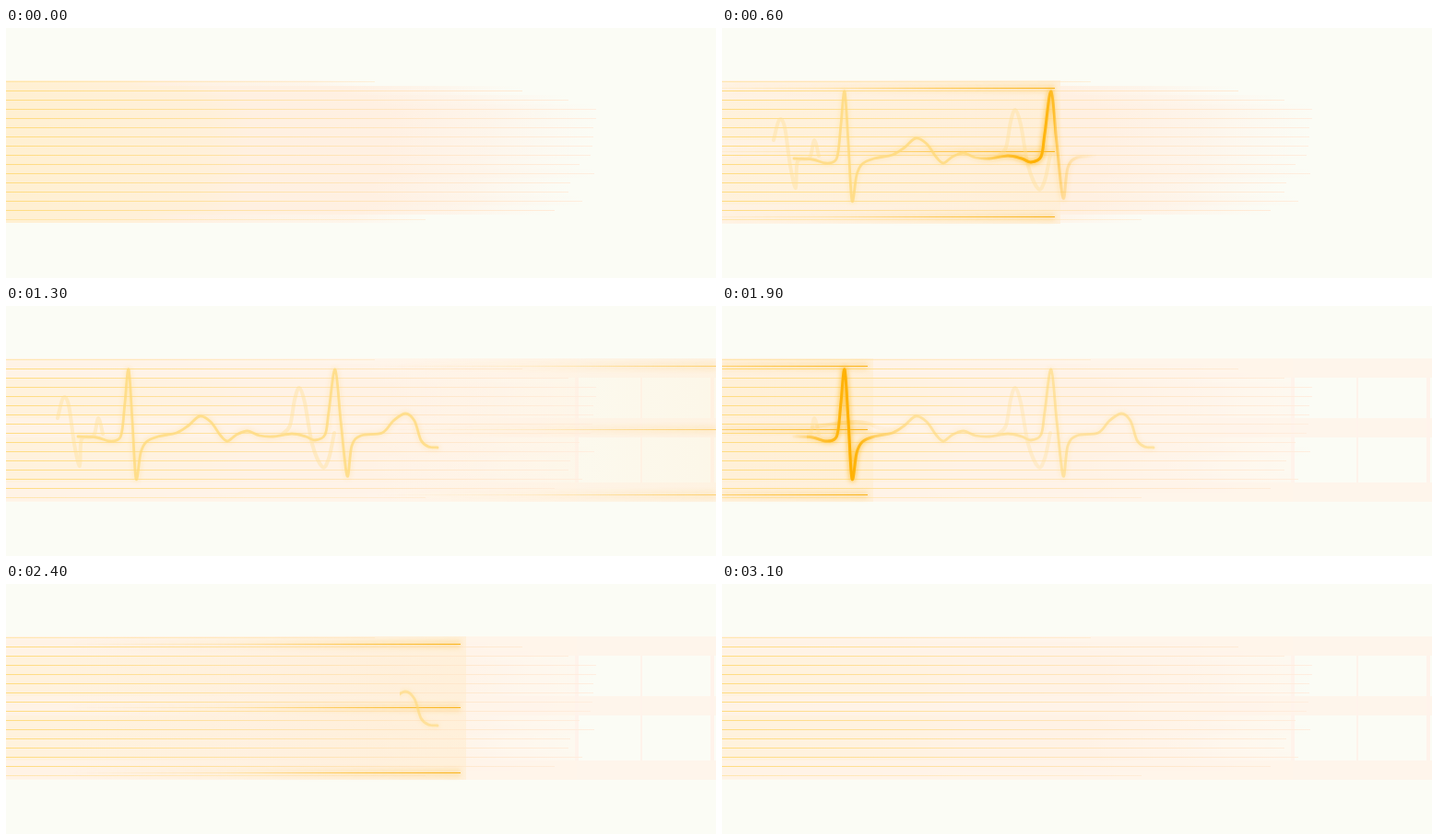
Animation of 770x272 px, one loop 3200 ms. Source, as an HTML page:

```html
<!DOCTYPE html>
<html lang="en">
<head>
<meta charset="utf-8">
<title>Pulse monitor</title>
<style>
  html, body { margin: 0; width: 100%; height: 100%; overflow: hidden; background: #fbfcf5; }
  svg { display: block; width: 770px; height: 272px; }
</style>
</head>
<body>
<svg id="stage" viewBox="0 0 770 272" fill="none">
  <defs>
    <linearGradient id="tailFade" gradientUnits="userSpaceOnUse" x1="-430" x2="0" y1="0" y2="0">
      <stop offset="0" stop-color="#ffc94a" stop-opacity="0"/>
      <stop offset=".4" stop-color="#ffc94a" stop-opacity=".28"/>
      <stop offset=".7" stop-color="#fdbd2c" stop-opacity=".7"/>
      <stop offset="1" stop-color="#fab41c"/>
    </linearGradient>
    <linearGradient id="washFade" gradientUnits="userSpaceOnUse" x1="-430" x2="0" y1="0" y2="0">
      <stop offset="0" stop-color="#ffedd0" stop-opacity="0"/>
      <stop offset="1" stop-color="#ffedd0" stop-opacity=".6"/>
    </linearGradient>
    <linearGradient id="beatFade" gradientUnits="userSpaceOnUse" x1="-85" x2="45" y1="0" y2="0">
      <stop offset="0" stop-color="#ffb000" stop-opacity="0"/>
      <stop offset=".38" stop-color="#ffb000" stop-opacity=".8"/>
      <stop offset=".5" stop-color="#ffb000"/>
      <stop offset=".6" stop-color="#ffb000" stop-opacity=".75"/>
      <stop offset=".72" stop-color="#ffb000" stop-opacity=".25"/>
      <stop offset="1" stop-color="#ffb000" stop-opacity="0"/>
    </linearGradient>
    <linearGradient id="ruleFade" gradientUnits="userSpaceOnUse" x1="0" x2="645" y1="0" y2="0">
      <stop offset="0" stop-color="#ffdc82"/>
      <stop offset=".4" stop-color="#ffe2a6"/>
      <stop offset=".7" stop-color="#ffe6c8"/>
      <stop offset="1" stop-color="#ffeee0"/>
    </linearGradient>
    <filter id="soft" filterUnits="userSpaceOnUse" x="-20" y="30" width="810" height="210">
      <feGaussianBlur stdDeviation="2.6"/>
    </filter>
    <filter id="trim" filterUnits="userSpaceOnUse" x="-20" y="30" width="810" height="210">
      <feGaussianBlur stdDeviation=".5"/>
    </filter>
    <clipPath id="sweptClip"><rect id="swept" y="0" height="272"/></clipPath>
    <clipPath id="echoClip"><rect id="echoArea" y="0" height="272"/></clipPath>
  </defs>
  <g id="band"></g>
  <g id="residue" clip-path="url(#sweptClip)"></g>
  <rect id="wash" x="0" y="57" height="156" fill="url(#washFade)"/>
  <g id="rules"></g>
  <g id="rails"></g>
  <g id="echo" clip-path="url(#echoClip)"></g>
  <g id="beat"></g>
</svg>
<script>
const PAGE = '#fbfcf5';
const LOOP = 3200, SWEEP = 1600, STEP = 100, SPEED = 0.67;
const $ = id => document.getElementById(id);

function add(parent, tag, attrs) {
  const node = document.createElementNS('http://www.w3.org/2000/svg', tag);
  for (const key in attrs) node.setAttribute(key, attrs[key]);
  return parent.appendChild(node);
}

// Smooth curve through points given as "x,y x,y ..."
function curve(text) {
  const p = text.split(' ').map(s => s.split(',').map(Number));
  const at = i => p[Math.max(0, Math.min(p.length - 1, i))];
  let d = 'M' + p[0];
  for (let i = 0; i < p.length - 1; i++) {
    const [a, b, c, e] = [at(i - 1), at(i), at(i + 1), at(i + 2)];
    const control = (o, from, to, sign) => o.map((v, k) => v + sign * (to[k] - from[k]) / 6);
    d += 'C' + [control(b, a, c, 1), control(c, b, e, -1), c].join(' ');
  }
  return d;
}

const trace = curve('78,142 98,143 112,147 122,145 126,135 129,105 133,69 137,125 141,188 ' +
  '146,160 152,148 165,142 185,138 198,130 210,120 222,126 232,140 240,147 250,140 262,136 ' +
  '275,141 290,142 310,139 325,142 335,146 346,140 350,115 357,69 363,125 370,185 ' +
  '375,152 385,141 408,138 420,125 433,117 443,125 450,146 458,153 468,154');
const ghosts = [
  curve('56,122 62,100 68,108 74,150 80,174 82,145 95,141 100,122 105,139'),
  curve('300,139 308,130 313,102 318,89 324,105 332,150 343,175 350,166 356,138')
];
const crest = curve('98,132 122,128 145,126 160,128 172,133 205,135');

// Ruled band with ragged right ends
const ends = [400, 560, 610, 640, 640, 637, 637, 636, 634, 622, 638, 612, 610, 625, 595, 455];
ends.forEach((end, i) => {
  const y = 58 + i * 10;
  const edge = i === 0 || i === 15;
  const top = i === 0 ? 57 : y - 5, bottom = i === 15 ? 212 : y + 5;
  const fade = add($('stage').querySelector('defs'), 'linearGradient',
    { id: 'halo' + i, gradientUnits: 'userSpaceOnUse', x1: 0, x2: end, y1: 0, y2: 0 });
  [[0, '#fff0d2', 1], [.34, '#fff0da', 1], [.42, '#fff0e1', 1],
   [.65, '#fff0e2', edge ? .7 : 1], [.82, '#fff1e5', .65], [1, '#fff3ea', 0]]
    .forEach(([offset, color, alpha]) =>
      add(fade, 'stop', { offset, 'stop-color': color, 'stop-opacity': alpha }));
  add($('band'), 'rect', { x: 0, y: top, width: end, height: bottom - top, fill: `url(#halo${i})` });
  add($('rules'), 'rect', { x: 0, y, width: end, height: 1, fill: 'url(#ruleFade)',
    opacity: edge ? .55 : 1 });
});

// Pale rails and uprights left behind by a sweep
for (const [y, height] of [[57, 21], [122, 21], [192, 21]])
  add($('residue'), 'rect', { x: 0, y, width: 770, height, fill: '#fff3e9', opacity: .75 });
add($('residue'), 'rect', { x: 0, y: 57, width: 619, height: 156, fill: '#fff3e9', opacity: .45 });
for (const [x, width] of [[617, 4], [688, 2], [764, 4]])
  add($('residue'), 'rect', { x, y: 78, width, height: 114, fill: '#fff3eb' });

const rails = [65, 134, 205].map(y => ({
  glow: add($('rails'), 'rect', { x: 0, y: y - 4, height: 9, fill: 'url(#tailFade)',
    opacity: .2, filter: 'url(#soft)' }),
  line: add($('rails'), 'rect', { x: 0, y, height: 1, fill: 'url(#tailFade)' })
}));

function stroke(parent, d, color, width, opacity, filter) {
  add(parent, 'path', { d, stroke: color, 'stroke-width': width, opacity,
    'stroke-linecap': 'round', 'stroke-linejoin': 'round', filter: `url(#${filter})` });
}
stroke($('echo'), trace, '#ffd978', 5, .3, 'soft');
stroke($('echo'), trace, '#ffd978', 2.8, .75, 'trim');
ghosts.forEach(d => stroke($('echo'), d, '#ffdf95', 4, .4, 'trim'));
stroke($('beat'), trace, 'url(#beatFade)', 6, .5, 'soft');
stroke($('beat'), trace, 'url(#beatFade)', 3, 1, 'trim');
stroke($('beat'), crest, 'url(#beatFade)', 4, .22, 'trim');

const span = (node, from, to) => {
  node.setAttribute('x', from);
  node.setAttribute('width', Math.max(0, to - from));
};

function draw(time) {
  const t = Math.floor((time % LOOP) / STEP) * STEP;
  const second = t >= SWEEP;
  const local = t % SWEEP;
  const head = SPEED * local - (second ? 43 : 41);
  const reach = Math.min(770, head);
  const fade = Math.max(0, Math.min(1, (1500 - local) / 300));

  for (const id of ['tailFade', 'washFade', 'beatFade'])
    $(id).setAttribute('gradientTransform', `translate(${head} 0)`);
  for (const rail of rails) {
    span(rail.glow, 0, reach);
    span(rail.line, 0, reach);
  }
  $('rails').setAttribute('opacity', fade);
  span($('wash'), 0, head > 0 ? Math.min(770, head + 6) : 0);
  $('wash').setAttribute('opacity', fade);

  span($('swept'), 0, second ? 770 : head > 0 ? head + 6 : 0);
  span($('echoArea'), second ? Math.max(0, head - 66) : 0, second ? 770 : head);
  $('echo').setAttribute('opacity', second ? .8 : 1);
  $('beat').setAttribute('opacity', head > 0 && head < 440 ? 1 : 0);
}

function tick() {
  draw(performance.now());
  requestAnimationFrame(tick);
}
tick();
</script>
</body>
</html>
```
